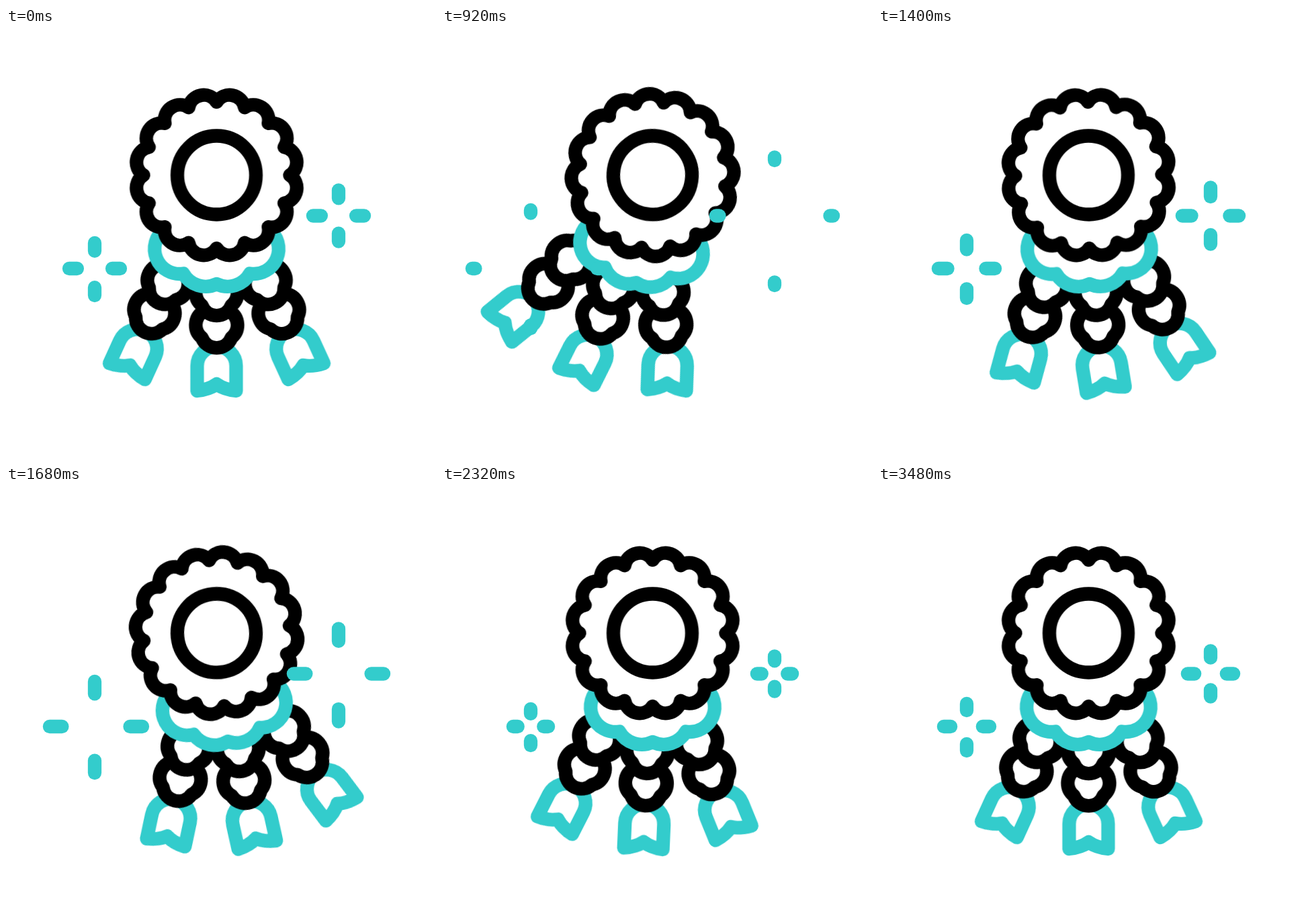
Animation, 640 px wide and 640 px high, one loop 3.52 s. Source, as an HTML page without scripts:

```html
<!DOCTYPE html>
<html lang="en">
<head>
<meta charset="utf-8">
<title>Swinging garland</title>
<style>
  @property --t { syntax: "<number>"; inherits: true; initial-value: 280; }
  @property --sway { syntax: "<angle>"; inherits: true; initial-value: 0deg; }

  html, body { margin: 0; width: 100%; height: 100%; overflow: hidden; background: #fff; }
  svg {
    display: block; width: 100vw; height: 100vh;
    fill: #fff; stroke: #000; stroke-width: 20.3;
    stroke-linecap: round; stroke-linejoin: round;
    animation: phase 3520ms linear infinite;
  }
  .teal { stroke: #3cc; }

  .swing { animation: swing 3520ms ease-in-out infinite; }
  .beads { animation: beads 3520ms ease-in-out infinite, sway 3520ms ease-in-out infinite; }
  .tassel { transform: rotate(var(--sway)); }

  /* Sparks: --t is the age in ms, a dash runs outwards from --from to --to */
  .spark { stroke: #3cc; fill: none; --far: 0; }
  .spark path {
    --from: max(10 + var(--t) * .0575, 40 + (var(--t) - 520) * .106);
    --to: min(10 + var(--t) * .1, 62 + (var(--t) - 520) * .0625);
    --drift: var(--far) * max(0, (var(--t) - 500) * .039);
    stroke-dasharray: calc(1px * max(.01, var(--to) - (var(--from)))) 999px;
    stroke-dashoffset: calc(-1px * (var(--from) + var(--drift)));
    opacity: clamp(0, 1000 - var(--t), 1);
  }
  .spark .far { --far: 1; }

  @keyframes phase {
    0%, 1.13% { --t: 280; }
    1.135% { --t: 40; }
    30.68%, 61.36%, 92.04% { --t: 1080; }
    30.681%, 61.361%, 92.041% { --t: 0; }
    100% { --t: 280; }
  }
  @keyframes swing {
    0%, 64.8%, 100% { transform: rotate(0deg); }
    14.8% { transform: rotate(-13.2deg); }
    27.3% { transform: rotate(9deg); }
    48.9% { transform: rotate(-6deg); }
  }
  @keyframes beads {
    0%, 78.4%, 100% { transform: rotate(0deg); }
    14.8% { transform: rotate(-12.4deg); }
    26.1% { transform: rotate(10.8deg); }
    44.3% { transform: rotate(-5deg); }
    64.8% { transform: rotate(2.5deg); }
  }
  @keyframes sway {
    0%, 53.4%, 100% { --sway: 0deg; }
    14.8% { --sway: -12deg; }
    26.1% { --sway: 7deg; }
    39.8% { --sway: -5.8deg; }
  }
</style>
</head>
<body>
<svg viewBox="0 0 640 640">
  <defs>
    <path id="bead" d="M-20 203A24 24 0 0 1 20 203A24 24 0 0 1 22 242A23.6 23.6 0 0 1-22 242A24 24 0 0 1-20 203Z"/>
    <g id="pendant">
      <g transform="translate(0 262)">
        <path class="tassel teal" d="M-29 59V22A29 29 0 0 1 29 22V59Q11 57 0 49Q-11 57-29 59Z"/>
      </g>
      <use href="#bead"/>
      <use href="#bead" y="-48"/>
    </g>
  </defs>

  <g transform="translate(313.5 219)">
    <g class="swing">
      <g class="beads">
        <use href="#pendant" transform="rotate(24.5)"/>
        <use href="#pendant" transform="rotate(-24.5)"/>
        <use href="#pendant"/>
      </g>
      <path class="teal" d="M-77 80A37 37 0 0 0-49.5 146.5A38 38 0 0 0 0 162A38 38 0 0 0 49.5 146.5A37 37 0 0 0 77 80Z"/>
      <path d="M0-109
        A23 23 0 0 1 41.7-100.7A23 23 0 0 1 77.1-77.1A23 23 0 0 1 100.7-41.7A23 23 0 0 1 109 0
        A23 23 0 0 1 100.7 41.7A23 23 0 0 1 77.1 77.1A23 23 0 0 1 41.7 100.7A23 23 0 0 1 0 109
        A23 23 0 0 1-41.7 100.7A23 23 0 0 1-77.1 77.1A23 23 0 0 1-100.7 41.7A23 23 0 0 1-109 0
        A23 23 0 0 1-100.7-41.7A23 23 0 0 1-77.1-77.1A23 23 0 0 1-41.7-100.7A23 23 0 0 1 0-109Z"/>
      <circle r="58.5"/>
    </g>
  </g>

  <g class="spark" transform="translate(495 279.5)">
    <path d="M0 0H140"/>
    <path class="far" d="M0 0V140"/>
    <path d="M0 0H-140"/>
    <path d="M0 0V-140"/>
  </g>
  <g class="spark" transform="translate(132 358)">
    <path class="far" d="M0 0H140"/>
    <path d="M0 2V140"/>
    <path d="M0 0H-140"/>
    <path d="M0 0V-140"/>
  </g>
</svg>
</body>
</html>
```
